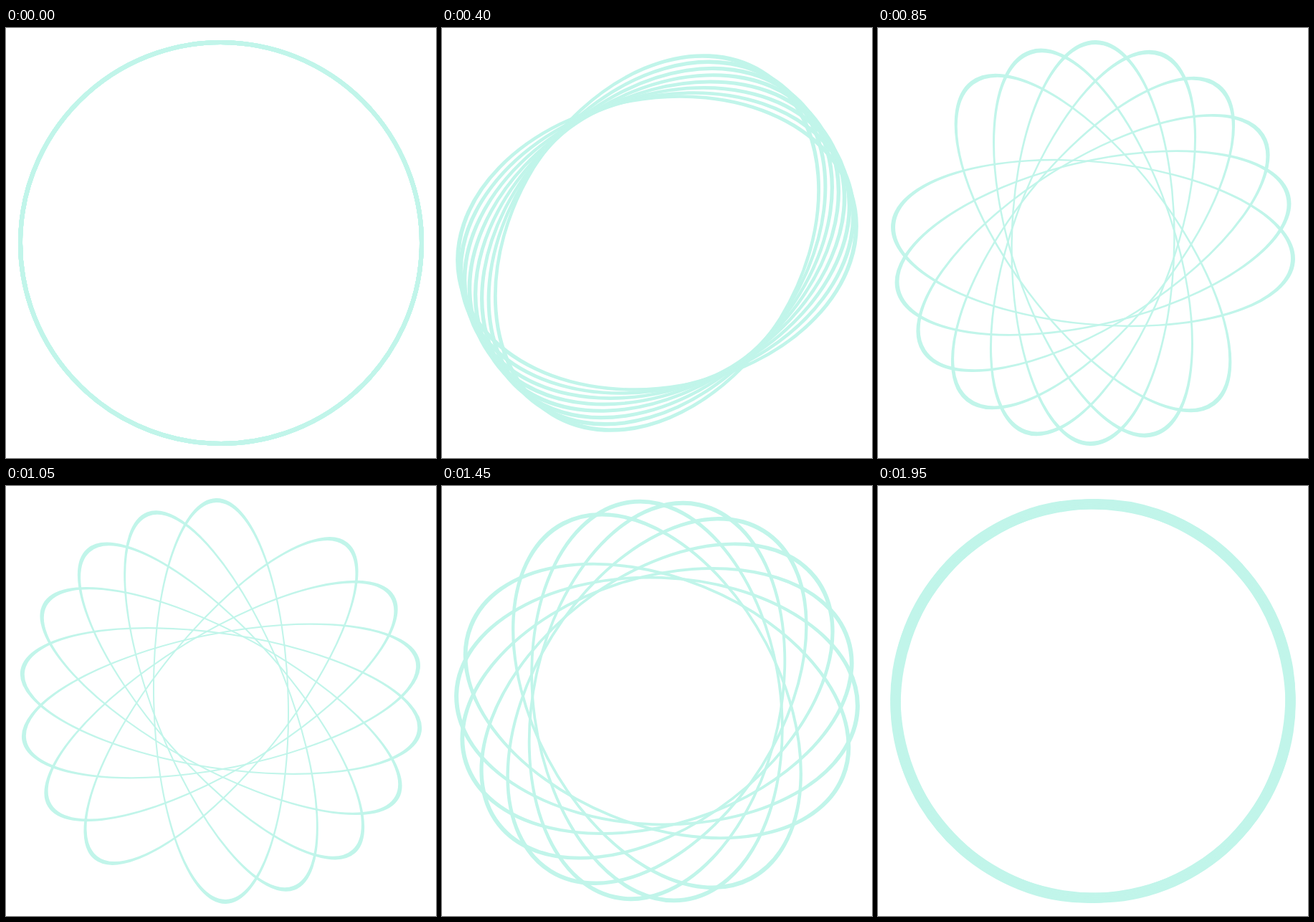
These frames come from a looping animation (600 by 600 pixels, 2 s). An HTML page:

```html
<!DOCTYPE html>
<html lang="en">
<head>
<meta charset="utf-8">
<title>Turning rings</title>
<style>
  html, body { margin: 0; width: 100%; height: 100%; overflow: hidden; background: #fff; }
  svg { display: block; width: 100%; height: 100%; }
</style>
</head>
<body>
<svg viewBox="0 0 600 600">
  <g id="rings" transform="translate(300 300)" fill="none" stroke="#c1f5ea" stroke-width="6"></g>
</svg>
<script>
const LOOP = 2000;
const STEP = 50;
const COUNT = 8;
const RADIUS = 280;
const MIN_SCALE = 0.3;
const SPACING = 20;
const START_ANGLE = -87;
const FIRST_OFFSET = 0.8;

const group = document.getElementById('rings');
const rings = Array.from({ length: COUNT }, () => {
  const ring = document.createElementNS('http://www.w3.org/2000/svg', 'circle');
  ring.setAttribute('r', RADIUS);
  return group.appendChild(ring);
});

const easeSine = p => (1 - Math.cos(Math.PI * p)) / 2;
const easePower = (p, g) =>
  p < 0.5 ? 0.5 * (2 * p) ** g : 1 - 0.5 * (2 - 2 * p) ** g;

function draw(time) {
  const p = time / LOOP;
  // Squash along one axis until half time, then relax back to a circle.
  const squash = MIN_SCALE + (1 - MIN_SCALE) * Math.abs(1 - 2 * p);
  const turn = START_ANGLE + 360 * easePower(p, 2.25);
  const spacing = SPACING * easeSine(Math.min(1, 2 * p));
  rings.forEach((ring, i) => {
    const angle = turn + (i + FIRST_OFFSET) * spacing;
    ring.setAttribute('transform', `rotate(${angle}) scale(1 ${squash})`);
  });
}

const start = performance.now();
function tick() {
  const time = (performance.now() - start) % LOOP;
  draw(Math.floor(time / STEP) * STEP);
  requestAnimationFrame(tick);
}
draw(0);
requestAnimationFrame(tick);
</script>
</body>
</html>
```
